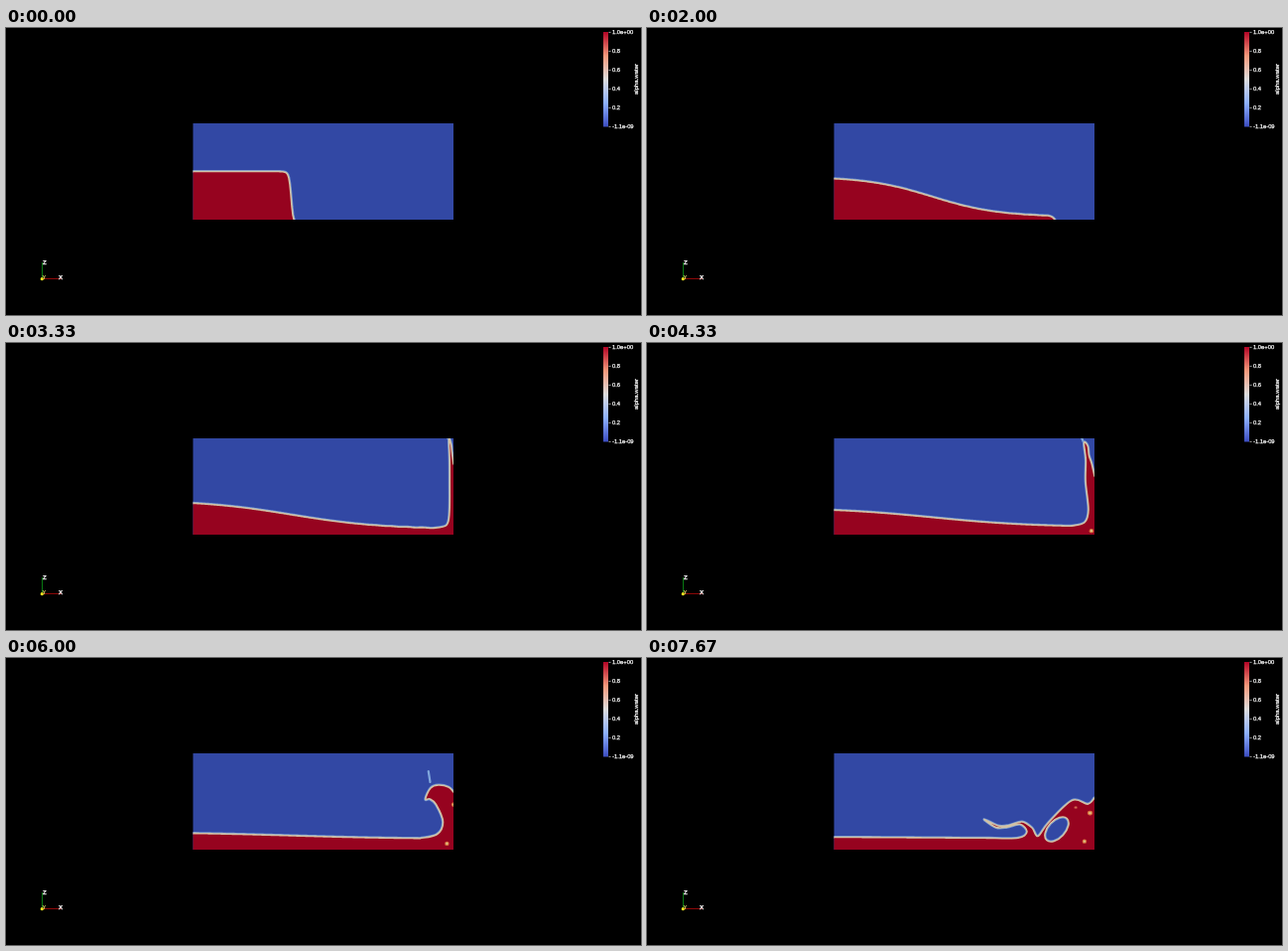
Recreate the animation shown at these times as an HTML page. Size 640 px wide and 289 px high, loop 8000 ms.

```html
<!DOCTYPE html>
<html lang="en">
<head>
<meta charset="utf-8">
<title>Dam break</title>
<style>
html, body { margin: 0; width: 100%; height: 100%; overflow: hidden; background: #000; }
svg { display: block; width: 640px; height: 289px; }
text { font: 5.8px "Liberation Sans", Arial, sans-serif; fill: #fff; stroke: #fff; stroke-width: .25; }
.axis { font-weight: bold; font-size: 6.2px; }
.rim { fill: none; stroke: #7397d4; stroke-width: 3; }
.water { fill: #96031f; fill-rule: evenodd; stroke: #d2c2a6; stroke-width: 1.6; stroke-linejoin: round; }
</style>
</head>
<body>
<svg viewBox="0 0 640 289">
  <defs>
    <clipPath id="tank"><rect x="188.5" y="96" width="262.5" height="97"/></clipPath>
    <linearGradient id="scale" x1="0" y1="1" x2="0" y2="0">
      <stop offset="0" stop-color="#3b4cc0"/>
      <stop offset=".25" stop-color="#8db0fe"/>
      <stop offset=".5" stop-color="#dddddd"/>
      <stop offset=".75" stop-color="#f4987a"/>
      <stop offset="1" stop-color="#b40426"/>
    </linearGradient>
  </defs>

  <g clip-path="url(#tank)">
    <rect x="188" y="96" width="263" height="97" fill="#3248a4"/>
    <path id="spray" fill="none" stroke="#7fa6dc" stroke-width="2.2" stroke-linecap="round"/>
    <path id="rim" class="rim"/>
    <path id="water" class="water"/>
    <g id="bubbles"></g>
  </g>

  <rect x="602" y="4" width="5" height="95.5" fill="url(#scale)"/>
  <g id="ticks"></g>
  <text transform="translate(637 67) rotate(-90)" style="font-size:6px">alpha.water</text>

  <path d="M36.5 252V236" stroke="#087a12"/>
  <path d="M37 252.5H56" stroke="#8c0808"/>
  <circle cx="36.3" cy="252.7" r="1.6" fill="#f2e620"/>
  <text class="axis" x="37" y="237.5">Z</text>
  <text class="axis" x="53" y="253">X</text>
  <text class="axis" x="36.8" y="253" style="fill:#e8e070;stroke:none;font-size:5px">Y</text>
</svg>

<script>
const LOOP = 8000, STEPS = 24;
const LEFT = 188, WALL = 451;
const NS = "http://www.w3.org/2000/svg";
const $ = id => document.getElementById(id);

const clamp = v => Math.max(0, Math.min(1, v));
const mix = (a, b, u) => a + (b - a) * u;
const mixPoints = (a, b, u) => a.map((p, i) => p.map((v, j) => mix(v, b[i][j], u)));
const logistic = v => 1 / (1 + Math.exp(-v));

// Wave thrown up by the wall: trough, inner face, tip, outer face;
// the last two points are the spray above it.
const climbing = [[430,187], [444,183.5], [447,170], [447.3,140], [447.2,118], [446.5,97],
  [448.5,102], [449.2,108], [450,115], [451,122], [442,90], [446,97]];
const leaning = [[424,183], [438,178], [443,166], [437,139], [437.5,118], [434.5,104],
  [440,106], [441.5,118], [446,127], [451,146], [432,96], [434.5,104]];
const plunging = [[411,181.5], [431,177], [438,164], [430,156], [417,166], [411,180],
  [416,156], [430,138], [446,133], [451,124], [419.5,132], [420.5,146]];

// Sheet thrown forward, relative to the valley where the wave lands.
const sheet = [[-20,1.8], [-11,-4.5], [-18,-12.2], [-31,-9.3], [-42,-9], [-54,-17],
  [-40,-10.5], [-29,-11], [-16,-14.5], [-6,-8.5], [0,0]];
// Remaining hump, as fractions of its width and height.
const hump = [[.18,.37], [.6,1], [.88,.9], [1,1.07]];

const bubbles = [
  { from: 11, x: 443, y: 186, vx: -.7, vy: -.45, rx: 2.2, ry: 2.2 },
  { from: 18, x: 449.5, y: 151, vx: -1, vy: 1.7, rx: 2.6, ry: 2.4 },
  { from: 19, x: 443.5, y: 141.5, vx: -3.8, vy: 3, rx: 1.8, ry: 1.6, dim: true }
];

function add(parent, tag, attrs, text) {
  const el = document.createElementNS(NS, tag);
  for (const name in attrs) el.setAttribute(name, attrs[name]);
  if (text) el.textContent = text;
  return parent.appendChild(el);
}

["1.0e+00", "0.8", "0.6", "0.4", "0.2", "-1.1e-09"].forEach((label, i) => {
  const y = 4.3 + i * 19;
  add($("ticks"), "rect", { x: 607.5, y: y - .4, width: 2, height: .8, fill: "#ccc" });
  add($("ticks"), "text", { x: 611, y: y + 2 }, label);
});

for (const b of bubbles) {
  b.el = add($("bubbles"), "g", {});
  add(b.el, "ellipse", { rx: b.rx, ry: b.ry, fill: b.dim ? "#b83a38" : "#d8743f" });
  add(b.el, "ellipse", { rx: b.rx / 2, ry: b.ry / 2, fill: b.dim ? "#d87a58" : "#dcc488" });
}

const frontX = k => 292 + 14 * k + k * k;

// The column slumps as a widening logistic step with a blunt nose.
function surface(x, k) {
  const top = 144.5 + 37.6 * (1 - Math.exp(-((k / 13) ** 2)));
  const bed = Math.max(194 - .65 * k, 181.8);
  const width = 1 + 66 * (1 - Math.exp(-k / 9));
  const step = at => logistic((at - 287.5) / width);
  const y = mix(top, bed, (step(x) - step(LEFT)) / (1 - step(LEFT)));
  const ripple = .5 * Math.sin(x / 2.5) * clamp((x - 340) / 80) * Math.exp(-(((k - 8) / 2) ** 2));
  return mix(y + ripple, 195, Math.exp(-(frontX(k) - x) / 2.5));
}

function wave(k) {
  const pts = k < 16 ? mixPoints(climbing, leaning, clamp((k - 10) / 6))
                     : mixPoints(leaning, plunging, (k - 16) / 4);
  const rise = clamp((k - 7.2) / 2.8);
  return pts.map(([x, y]) => [x, mix(188, y, rise)]);
}

function splash(k) {
  const u = (k - 21) / 2, grow = (k - 19.5) / 3.5;
  const vx = mix(408, 394, u), vy = 179.5, height = vy - mix(135, 143.5, u);
  return [
    [vx - 49 * grow, 0],
    ...sheet.map(([x, y]) => [vx + x * grow, vy + y * grow]),
    ...hump.map(([x, y]) => [mix(vx, WALL, x), vy - y * height])
  ];
}

function trapped(k) {
  const u = (k - 21) / 2, a = -.82, r = mix(17, 15, u);
  const x = mix(422, 413, u), y = mix(170, 172.5, u);
  const dx = r * Math.cos(a), dy = r * Math.sin(a);
  const arc = `A${r} 8.7 ${a * 180 / Math.PI} 1 1 `;
  return `M${x - dx} ${y - dy}${arc}${x + dx} ${y + dy}${arc}${x - dx} ${y - dy}Z`;
}

// Catmull-Rom spline as cubic segments, continuing from the first point.
function spline(pts) {
  const at = i => pts[Math.max(0, Math.min(pts.length - 1, i))];
  return pts.slice(1).map((b, i) => {
    const p = at(i - 1), a = at(i), q = at(i + 2);
    const c1 = a.map((v, j) => v + (b[j] - p[j]) / 6);
    const c2 = b.map((v, j) => v - (q[j] - a[j]) / 6);
    return "C" + [...c1, ...c2, ...b].map(v => v.toFixed(2)).join(" ");
  }).join("");
}

function draw(k) {
  let breaker = [], spray = [];
  if (k > 20) breaker = splash(k);
  else if (k >= 8) {
    breaker = wave(k);
    spray = breaker.splice(-2);
  }

  const end = breaker.length ? breaker[0][0] : frontX(k);
  if (breaker.length) breaker[0][1] = surface(end, k);
  let d = `M170 ${surface(LEFT, k)}`;
  for (let x = LEFT; x < end; x++) d += `L${x} ${surface(x, k).toFixed(2)}`;
  d += `L${end} ${surface(end, k)}` + spline(breaker);
  const last = breaker.length ? breaker[breaker.length - 1][1] : 196;
  d += `L470 ${last}V210H170Z`;
  if (k > 20) d += trapped(k);

  $("rim").setAttribute("d", d);
  $("water").setAttribute("d", d);
  $("spray").setAttribute("d", k >= 10 && spray.length ? `M${spray[0]}L${spray[1]}` : "");
  for (const b of bubbles) {
    const t = k - 20;
    b.el.setAttribute("visibility", k >= b.from ? "visible" : "hidden");
    b.el.setAttribute("transform", `translate(${b.x + b.vx * t} ${b.y + b.vy * t})`);
  }
}

let shown = -1;
function tick() {
  const t = performance.now() % LOOP;
  const k = Math.floor((t + 4) * STEPS / LOOP) % STEPS;
  if (k !== shown) draw(shown = k);
  requestAnimationFrame(tick);
}
tick();
</script>
</body>
</html>
```
